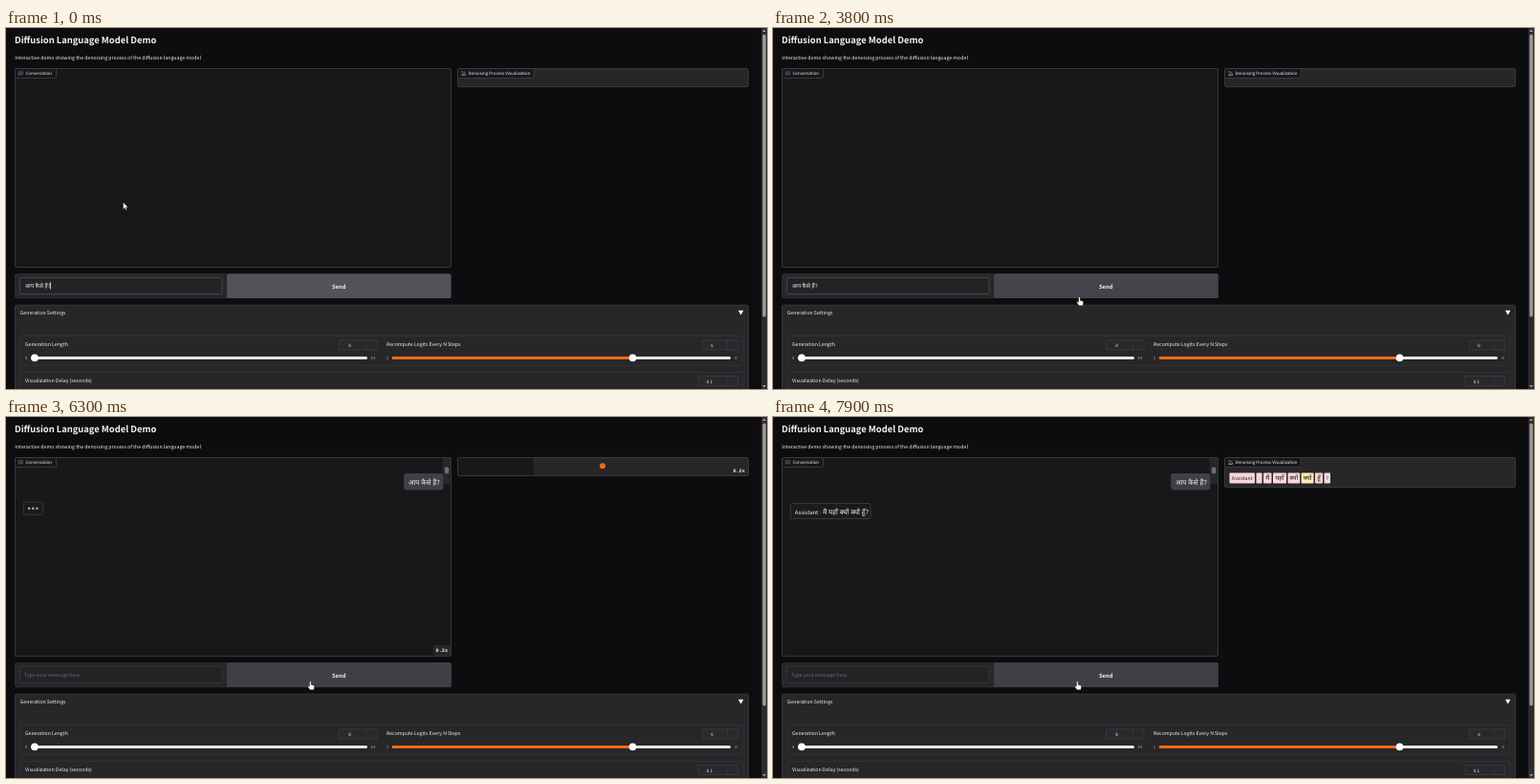
An HTML page for the animation above (8 s loop, 796 px wide and 378 px high).

```html
<!DOCTYPE html>
<html lang="en">
<head>
<meta charset="utf-8">
<title>Diffusion Language Model Demo</title>
<style>
  html, body { margin: 0; width: 100%; height: 100%; overflow: hidden; background: #0d0d0f; }
  svg { display: block; width: 796px; height: 378px; }
  text {
    font-family: "Noto Sans CJK SC", "Noto Sans CJK JP", "Noto Sans CJK", "Noto Sans", sans-serif;
    fill: #f4f4f5; white-space: pre; text-rendering: geometricPrecision;
  }
  .hi { font-family: "Noto Sans Devanagari", "Noto Sans", sans-serif; }
  .mono { font-family: "Liberation Mono", "DejaVu Sans Mono", monospace; font-weight: bold; }
  .bold { font-weight: bold; }
  .dim { fill: #a1a1aa; }
  .hint { fill: #6a6a73; }
  .mid { text-anchor: middle; }
  .ink { fill: #1f1f23; }
</style>
</head>
<body>
<svg id="stage" viewBox="0 0 796 378"></svg>
<script>
const LOOP = 8000;
const BG = '#0d0d0f', DARK = '#18181b', PANEL = '#27272a', LINE = '#3f3f46', ORANGE = '#f26a1b';

const rect = (x, y, w, h, fill, stroke = 'none', r = 0, extra = '') =>
  `<rect x="${x}" y="${y}" width="${w}" height="${h}" rx="${r}" fill="${fill}" stroke="${stroke}" ${extra}/>`;
const text = (x, y, size, str, cls = '', id = '') =>
  `<text x="${x}" y="${y}" font-size="${size}" class="${cls}" id="${id}">${str}</text>`;
const group = (id, ...parts) => `<g id="${id}">${parts.join('')}</g>`;
const path = (d, fill, stroke = 'none', width = 0.6) =>
  `<path d="${d}" fill="${fill}" stroke="${stroke}" stroke-width="${width}" stroke-linejoin="round"/>`;
const dot = (x, y, r, fill, id = '') => `<circle cx="${x}" cy="${y}" r="${r}" fill="${fill}" id="${id}"/>`;

const numberBox = (x, y, w, split, value) =>
  rect(x, y, w, 10, '#29292c', '#38383d', 1) +
  path(`M${split} ${y}v10`, 'none', '#38383d', 0.8) +
  text((x + split) / 2 - 3, y + 7, 4.6, value, 'mid');

const slider = (x1, x2, thumb, filled) =>
  rect(x1, 344, x2 - x1, 3, '#e4e4e7', 'none', 1.5) +
  (filled ? rect(x1, 344, thumb - x1, 3, ORANGE, 'none', 1.5) : '') +
  dot(thumb, 345.4, 3.8, '#fff');

const panelLabel = (x, w, str) =>
  rect(x, 42.5, w, 10, DARK, LINE, 1, 'stroke-width=".8"') + text(x + 11, 49.4, 4.46, str);

const stage = document.getElementById('stage');
stage.innerHTML = [
  rect(0, 0, 796, 378, BG),
  text(9, 16, 9.38, 'Diffusion Language Model Demo', 'bold'),
  text(9.3, 32.6, 5.21, 'Interactive demo showing the denoising process of the diffusion language model'),

  // conversation
  rect(9.5, 42.5, 456, 208, DARK, LINE, 1.5, 'stroke-width=".8"'),
  panelLabel(9.5, 43, 'Conversation'),
  path('M13.3 45.8h4v2.8h-2.4l-.9 .9v-.9h-.7z M14.3 47.2h2', 'none', '#8b8b93', 0.5),
  group('userTurn',
    rect(456.5, 43, 8.7, 27, PANEL),
    path('M458.8 54h4.4M460.2 54v-.9h1.6v.9M459.3 54l.3 4.7h2.8l.3-4.7M460.5 55.2v2.4M461.5 55.2v2.4', 'none', '#b4b4bb', 0.6),
    rect(416.5, 59.5, 40.5, 16.5, LINE, '#47474f', 2, 'stroke-width=".6"'),
    text(421, 70.6, 7.2, 'आप कैसे हैं?', 'hi')),
  group('pending',
    rect(18.3, 89, 20.5, 13.3, '#1b1b1e', LINE, 2, 'stroke-width=".8"'),
    [0, 1, 2].map(i => dot(24.1 + i * 4.2, 95.7, 1.3, '#b4b4bb', 'dot' + i)).join('')),
  group('reply',
    rect(18.3, 90.5, 83.7, 16, '#1b1b1e', LINE, 2, 'stroke-width=".8"'),
    text(22.8, 101.6, 5.85, 'Assistant :'),
    text(52, 101.6, 7.1, 'मैं यहाँ क्यों क्यों हूँ?', 'hi')),
  group('chatTimer',
    rect(447, 239, 18, 11, PANEL, 'none', 1),
    text(449.6, 246.2, 5.2, '', 'mono', 'chatSeconds')),

  // visualization
  rect(472.5, 42.5, 304, 19, PANEL, LINE, 1.5, 'stroke-width=".8" id="vizBox"'),
  group('vizLabel',
    panelLabel(472.5, 79.5, 'Denoising Process Visualization'),
    path('M476.4 45.8h1.6M476.4 49.4h4v-1.8M476.8 49l3.4-3.2', 'none', '#d4d4d8', 0.6)),
  group('vizLoading',
    rect(473, 43, 0, 18, DARK, 'none', 0, 'id="eta"'),
    dot(624, 51.3, 3, ORANGE),
    text(760.4, 58, 5.2, '', 'mono', 'vizSeconds')),
  group('tokens'),

  // message row
  rect(9.5, 257.5, 222, 25.3, PANEL, '#303034', 1.5, 'stroke-width=".8"'),
  rect(14.5, 261.5, 211.5, 17, '#232326', LINE, 1.5, 'stroke-width=".8" id="input"'),
  group('draft', text(19.8, 272.2, 5.85, 'आप कैसे हैं?', 'hi')),
  rect(46.2, 266, 0.7, 7.6, '#fff', 'none', 0, 'id="caret"'),
  text(19, 272.2, 5.2, 'Type your message here...', 'hint', 'placeholder'),
  rect(231, 257.3, 234.6, 25.7, '#52525b', 'none', 1.5),
  rect(231, 257.3, 234.6, 25.7, LINE, 'none', 1.5, 'id="hover"'),
  text(348.2, 272.6, 5.85, 'Send', 'bold mid'),

  // settings
  rect(9.5, 290.2, 767, 110, PANEL, LINE, 1.5, 'stroke-width=".8"'),
  text(14.8, 300.2, 5.2, 'Generation Settings'),
  path('M766 295.7h5.4l-2.7 4.8z', '#fff'),
  rect(15, 322.5, 756, 30.8, PANEL, '#35353a', 1.5, 'stroke-width=".8"'),
  rect(15, 360.5, 756, 30, PANEL, '#35353a', 1.5, 'stroke-width=".8"'),
  text(20, 333, 5.2, 'Generation Length'),
  text(398, 333, 5.2, 'Recompute Logits Every N Steps'),
  text(20, 370.6, 5.2, 'Visualization Delay (seconds)'),
  numberBox(348.5, 327, 39.5, 376.5, '8'),
  numberBox(728.5, 327, 37.5, 754.5, '6'),
  numberBox(724, 364.5, 41.5, 754, '0.1'),
  slider(26, 378, 30, false),
  slider(404, 758, 655.5, true),
  [[21.3, '8'], [384, '64'], [399, '1'], [763.5, '8']].map(([x, s]) => text(x, 347.2, 4.4, s, 'dim mid')).join(''),

  // scrollbar
  rect(790, 0, 6, 378, '#2b2b2d'),
  rect(791.4, 6.5, 3.4, 296, '#9f9f9f', 'none', 1.7),
  path('M791.2 4h3.8l-1.9-2.6zM791.2 374h3.8l-1.9 2.6z', '#9f9f9f'),

  group('arrow', path('M0 0v7.2l1.7-1.5 1.1 2.5 1.2-.5-1.1-2.5h2.2z', '#fff', '#111', 0.4)),
  group('hand', path('M-.8 .8a.9 .9 0 0 1 1.8 0v2.7l2.7 .7q.9 .3 .8 1.2l-.7 3.7h-4l-2.5-3.4q-.3-.9 .6-.9l1.3 .8z', '#fff', '#111', 0.5))
].join('');

const el = Object.fromEntries([...stage.querySelectorAll('[id]')].filter(n => n.id).map(n => [n.id, n]));
const show = (name, on) => { el[name].style.display = on ? '' : 'none'; };
const clamp = v => Math.min(1, Math.max(0, v));

const CLICK = 5400, ANSWERING = 6100, ANSWERED = 6600;
const CARET_FLIPS = [600, 1100, 1600, 2100, 2700, 3200, 3700, 4200, 4700, 5200];
const POINTER = [[3600, 122.6, 182.6], [3800, 320.3, 281.7], [4000, 319, 279], [4300, 318.2, 276.7]];

// word, cell width, time it is revealed
const TOKENS = [
  ['Assistant', 26.5, 6700], [':', 6, 6800], ['मैं', 8.5, 6900], ['यहाँ', 14, 7000],
  ['क्यों', 12.6, 7200], ['क्यों', 12.9, 7500], ['हूँ', 8, 7300], ['?', 6.5, 7400]
];

function pointerAt(t) {
  let i = POINTER.findIndex(p => p[0] > t);
  if (i === 0) return POINTER[0].slice(1);
  if (i < 0) return POINTER[POINTER.length - 1].slice(1);
  const [a, b] = [POINTER[i - 1], POINTER[i]], k = (t - a[0]) / (b[0] - a[0]);
  return [a[1] + (b[1] - a[1]) * k, a[2] + (b[2] - a[2]) * k];
}

function drawTokens(t) {
  const newest = Math.max(...TOKENS.map(k => k[2]).filter(at => at <= t));
  let x = 477.5;
  return TOKENS.map(([word, width, at], i) => {
    const open = at <= t, w = open ? width : 22;
    const fill = !open ? '#dfe5fb' : at === newest ? '#fbedb4' : '#fbd6db';
    const hindi = open && i > 1 && word !== '?';
    const cell = rect(x, 58.5, w, 11, fill, 'none', 0.8) +
      text(x + w / 2, 66, hindi ? 6.5 : 5.2, open ? word : '[MASK]', hindi ? 'hi mid ink' : 'mid ink');
    x += w + 1.5;
    return cell;
  }).join('');
}

let last = -1;
function render(t) {
  if (t === last) return;
  last = t;
  const sent = t >= ANSWERING, done = t >= ANSWERED;
  const seconds = ((t - (sent ? ANSWERING : CLICK)) / 1000).toFixed(1) + 's';

  show('draft', !sent);
  show('placeholder', sent);
  show('caret', t < CLICK && CARET_FLIPS.filter(f => f <= t).length % 2 === 0);
  el.input.setAttribute('stroke', sent ? '#38383d' : '#4b4b53');
  el.hover.setAttribute('opacity', clamp((t - 3660) / 200));

  show('userTurn', sent);
  show('pending', sent && !done);
  show('reply', done);
  show('chatTimer', t >= CLICK && !done);
  el.chatSeconds.textContent = el.vizSeconds.textContent = seconds;
  for (let i = 0; i < 3; i++)
    el['dot' + i].setAttribute('opacity', 0.75 + 0.25 * Math.cos((t - 6300) / 200 - i * 0.6));

  show('vizLoading', sent && !done);
  show('vizLabel', !sent || done);
  el.eta.setAttribute('width', 303 * clamp((t - ANSWERING) / 770));
  el.vizBox.setAttribute('height', done ? 31 : 19);
  el.tokens.innerHTML = done ? drawTokens(t) : '';

  const [x, y] = pointerAt(t), over = t >= 3800;
  show('arrow', !over);
  show('hand', over);
  el[over ? 'hand' : 'arrow'].setAttribute('transform', `translate(${x} ${y})`);
}

const start = performance.now();
function tick() {
  render(Math.floor((performance.now() - start) % LOOP / 100) * 100);
  requestAnimationFrame(tick);
}
tick();
</script>
</body>
</html>
```
